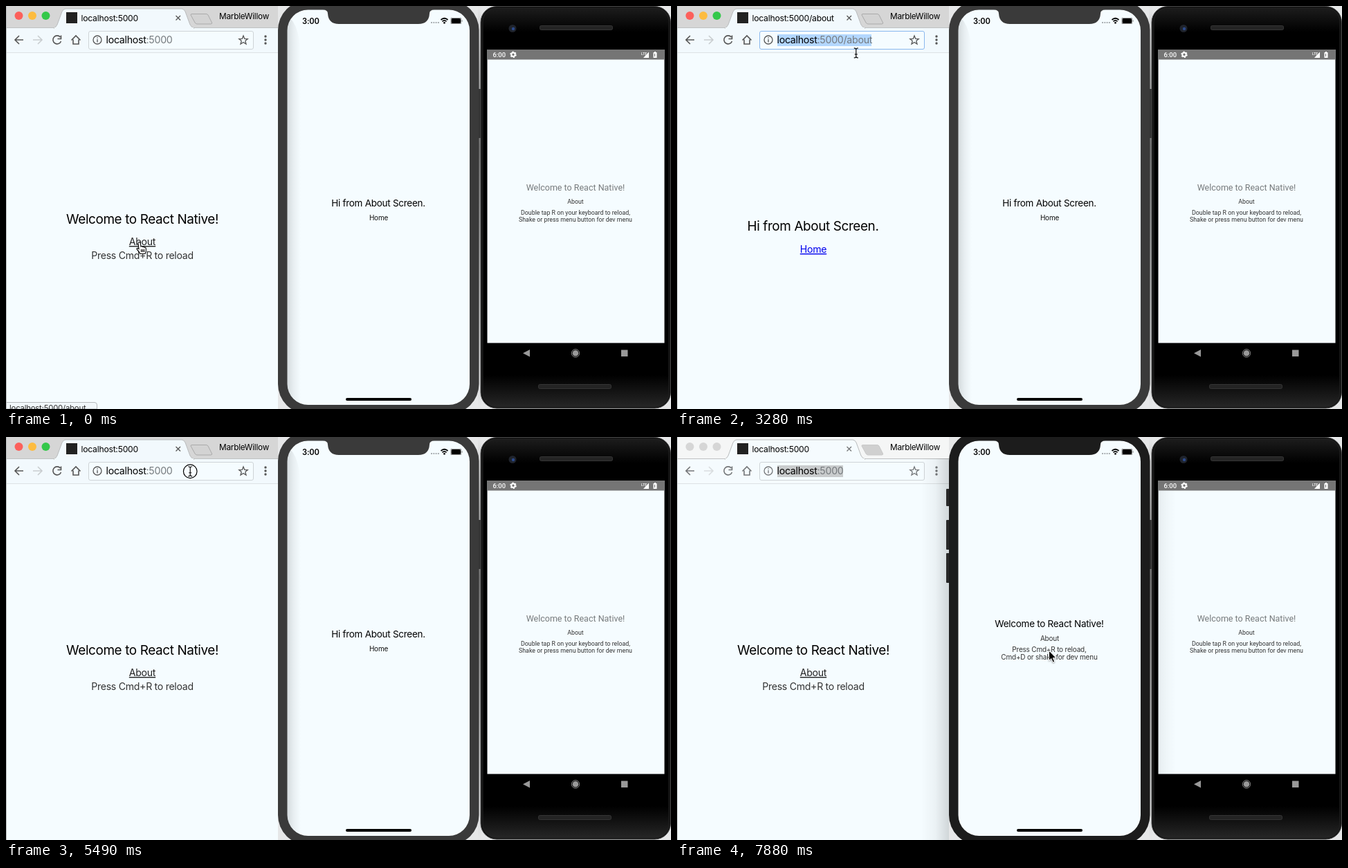
These frames come from a looping animation (961 px wide and 583 px high, 8000 ms). An HTML page:

```html
<!DOCTYPE html>
<html lang="en">
<head>
<meta charset="utf-8">
<title>One app on three screens</title>
<style>
  html, body { margin: 0; width: 100%; height: 100%; overflow: hidden; }
  svg { display: block; width: 961px; height: 583px; }
  text { font-family: Inter, "Open Sans", sans-serif; letter-spacing: -.02em; white-space: pre; }
  .mid { text-anchor: middle; }
  .droid text { font-family: Roboto, sans-serif; letter-spacing: 0; }
  .big { font-size: 18.9px; }
  .body { font-size: 14.1px; }
  .link { text-decoration: underline; }
  .small { font-size: 10px; }

  svg {
    --strip: #d6d6d6; --bar: #f2f9fd; --icon: #555; --faint: #c9cdd0;
    --red: #fc605b; --amber: #fdbc40; --green: #34c84a;
    --bezel: #3a3a3a; --plus: #d3d3d3; --plusEdge: #aaa; --mark: #b3d7ff;
  }
  svg.away {
    --strip: #f5f6f6; --bar: #f5fbfe; --icon: #747678; --faint: #d9dddf;
    --red: #d6d6d6; --amber: #d6d6d6; --green: #d6d6d6;
    --bezel: #1c1c1c; --plus: #d0d0d0; --plusEdge: #c8c8c8; --mark: #c9cccd;
  }
  .away .ifActive, svg:not(.away) .ifAway { display: none; }
  .icon { fill: none; stroke: var(--icon); stroke-width: 1.6; }
</style>
</head>
<body>
<svg id="stage" viewBox="0 0 961 583">
  <defs>
    <linearGradient id="fadeRight">
      <stop offset="0" stop-color="#000" stop-opacity=".13"/>
      <stop offset=".5" stop-color="#000" stop-opacity=".05"/>
      <stop offset="1" stop-color="#000" stop-opacity="0"/>
    </linearGradient>
    <linearGradient id="fadeLeft">
      <stop offset="0" stop-color="#000" stop-opacity="0"/>
      <stop offset=".5" stop-color="#000" stop-opacity=".04"/>
      <stop offset="1" stop-color="#000" stop-opacity=".15"/>
    </linearGradient>
    <linearGradient id="gap" x2="0" y2="1">
      <stop offset="0" stop-color="#e6e7e8"/>
      <stop offset=".35" stop-color="#777"/>
      <stop offset="1" stop-color="#e6e7e8"/>
    </linearGradient>
    <linearGradient id="shell" x2="0" y2="1">
      <stop offset="0" stop-color="#1c1c1c"/>
      <stop offset=".06" stop-color="#000"/>
      <stop offset=".92" stop-color="#000"/>
      <stop offset="1" stop-color="#262626"/>
    </linearGradient>
  </defs>
  <rect width="961" height="583" fill="#e6e7e8"/>

  <!-- browser -->
  <rect width="393" height="583" fill="#f5fcff"/>
  <rect width="393" height="31" fill="var(--strip)"/>
  <rect y="31" width="393" height="36" fill="var(--bar)"/>
  <path d="M0 31.5H69M271 31.5H393" stroke="#bfc1c2"/>
  <path d="M0 67.5H393" stroke="#dde2e4"/>
  <path d="M69 32Q72 31 74 27L81 8Q83 4 86 4H254Q257 4 259 8L266 27Q268 31 272 32Z" fill="var(--bar)" stroke="#b9bbbc"/>
  <path d="M70 32H271" stroke="var(--bar)" stroke-width="2"/>
  <path d="M269 11.500H289Q291 11.500 292 13L297.500 24Q298 26 296 26H276Q274 26 273 24L267 13Q266.500 11.500 269 11.500Z" fill="var(--plus)" stroke="var(--plusEdge)"/>
  <circle cx="18.500" cy="14" r="6" fill="var(--red)"/>
  <circle cx="38" cy="14" r="6" fill="var(--amber)"/>
  <circle cx="57.500" cy="14" r="6" fill="var(--green)"/>
  <rect x="87" y="9" width="16" height="16" fill="#222"/>
  <text id="title" x="108.500" y="21.500" font-size="12.2"></text>
  <path d="M245.500 14L252 20.500M252 14L245.500 20.500" class="icon" style="stroke-width:1.3"/>
  <text x="308" y="19" font-size="11.8">MarbleWillow</text>

  <g class="icon">
    <path d="M25 49H13M19 43L13 49L19 55"/>
    <path d="M39 49H51M46 43L52 49L46 55" stroke="var(--faint)"/>
    <path d="M78.500 45A6 6 0 1 0 79.500 51M79.500 42.500V47.500H74.500"/>
    <path d="M94.500 49.500L101 43L107.500 49.500M97 48.500V55H105V48.500"/>
  </g>
  <rect id="box" x="119.500" y="36.500" width="238" height="26" rx="2.500" fill="#f5fcff"/>
  <g class="icon" style="stroke-width:1.3">
    <circle cx="132" cy="49" r="6"/>
    <path d="M132 48V52.500M132 45.300V46.700"/>
    <path d="M343 43L344.700 47.300L349.300 47.600L345.800 50.600L347 55L343 52.500L339 55L340.200 50.600L336.700 47.600L341.300 47.300Z"/>
  </g>
  <g fill="var(--icon)">
    <circle cx="375" cy="44" r="1.700"/><circle cx="375" cy="49" r="1.700"/><circle cx="375" cy="54" r="1.700"/>
  </g>
  <rect id="mark" x="145" y="41" width="95" height="17" fill="var(--mark)"/>
  <text x="144.500" y="54" font-size="14.2">localhost<tspan id="path" fill="#757a7d"></tspan></text>

  <g id="webHome" class="mid">
    <text x="197" y="314.500" class="big">Welcome to React Native!</text>
    <text x="197" y="346" class="body link" fill="#222">About</text>
    <text x="197" y="365.500" class="body" fill="#333">Press Cmd+R to reload</text>
  </g>
  <g id="webAbout" class="mid">
    <text x="196.500" y="325" class="big">Hi from About Screen.</text>
    <text id="webLink" x="197" y="357" class="body link">Home</text>
  </g>
  <g id="status">
    <path d="M0 573.500H128Q131.500 573.500 131.500 577V583H0Z" fill="#f1f7fa" stroke="#b5b9bb"/>
    <text id="hint" x="5" y="586" font-size="11.4" fill="#333"></text>
  </g>
  <path d="M.5 0V583" stroke="#b8bcbe"/>
  <rect class="ifAway" x="353" y="31" width="40" height="552" fill="url(#fadeLeft)"/>

  <!-- left phone -->
  <g class="ifAway" fill="#292929">
    <rect x="389" y="75" width="6" height="25" rx="1"/>
    <rect x="389" y="120" width="6" height="43" rx="1"/>
    <rect x="389" y="168" width="6" height="43" rx="1"/>
  </g>
  <rect x="682" y="0" width="5" height="583" fill="url(#gap)"/>
  <rect x="682" y="120" width="5" height="71" fill="#333"/>
  <rect x="393" y="-8" width="290.500" height="598" rx="43" fill="var(--bezel)"/>
  <path d="M436 5.500H458Q465 5.500 465 11Q466 26 481 26H596Q611 26 612 11Q612 5.500 619 5.500H640A30 30 0 0 1 670 35.500V547A30 30 0 0 1 640 577H436.500A30 30 0 0 1 406.500 547V35.500A30 30 0 0 1 436.500 5.500Z" fill="#f5fcff"/>
  <path class="ifActive" d="M406.500 36Q407 26 412 19Q426 35 426 80V575Q406.500 568 406.500 547Z" fill="url(#fadeRight)"/>
  <text x="428" y="25.500" font-size="11.2" font-weight="600">3:00</text>
  <path d="M614 24H626" stroke="#aab0b3" stroke-width="2" stroke-dasharray="2 1.300"/>
  <path d="M628.500 20Q633.500 15.500 638.500 20M630.500 22.300Q633.500 19.500 636.500 22.300" fill="none" stroke="#000" stroke-width="1.700"/>
  <circle cx="633.500" cy="24.300" r="1.400"/>
  <rect x="643.500" y="18" width="13.500" height="7" rx="1.500"/>
  <path d="M643 17.500H657.500V25.500H643ZM659 20V23" fill="none" stroke="#777" stroke-width=".8"/>
  <g id="iosAbout" class="mid">
    <text x="538" y="290" font-size="13.5">Hi from About Screen.</text>
    <text id="iosLink" x="538.500" y="310" class="small" fill="#111">Home</text>
  </g>
  <g id="iosHome" class="mid">
    <text x="538" y="275" font-size="13.5">Welcome to React Native!</text>
    <g class="small" fill="#333">
      <text x="538.500" y="294.500">About</text>
      <text x="538" y="310.500">Press Cmd+R to reload,</text>
      <text x="538" y="322">Cmd+D or shake for dev menu</text>
    </g>
  </g>
  <rect x="491" y="567" width="95" height="4" rx="2"/>

  <!-- right phone -->
  <g class="droid">
    <rect x="686" y=".5" width="274.500" height="581.500" rx="23" fill="#111" stroke="#4a4a4a"/>
    <rect x="689" y="3" width="269" height="577" rx="20" fill="url(#shell)" stroke="#222"/>
    <g fill="#242424" stroke="#353535">
      <rect x="771.500" y="28.500" width="105" height="6" rx="2"/>
      <rect x="769.500" y="547.500" width="105" height="6" rx="2"/>
    </g>
    <circle cx="732" cy="32.500" r="5.500" fill="#20242c"/>
    <circle cx="733" cy="33" r="2.200" fill="#2c4a8c"/>
    <rect x="695.500" y="63" width="256" height="424.500" fill="#f5fcff"/>
    <rect x="695.500" y="63" width="256" height="14.500" fill="#757575"/>
    <g fill="#fff">
      <text x="703.500" y="73.800" font-size="9.4" font-weight="500">6:00</text>
      <circle cx="733" cy="70.300" r="2.700" fill="none" stroke="#fff" stroke-width="2"/>
      <circle cx="733" cy="70.300" r="4" fill="none" stroke="#fff" stroke-width="1.500" stroke-dasharray="2.100 2.090"/>
      <text x="918" y="70.500" font-size="5" font-weight="500">LTE</text>
      <path d="M921 75L929 66.500V75Z"/>
      <path d="M935.500 67H937V66H939V67H940.500V75H935.500Z"/>
    </g>
    <path d="M937.500 69V73" stroke="#757575"/>
    <g class="mid">
      <text x="823" y="267" font-size="12.5" fill="#777b7d">Welcome to React Native!</text>
      <g font-size="8.85" fill="#333">
        <text x="823" y="286.300">About</text>
        <text x="823" y="301.500">Double tap R on your keyboard to reload,</text>
        <text x="823" y="311.700">Shake or press menu button for dev menu</text>
      </g>
    </g>
    <rect class="ifAway" x="695.500" y="77.500" width="26" height="410" fill="url(#fadeRight)" opacity=".45"/>
    <g fill="#999">
      <path d="M747 502.300L757 497V507.600Z"/>
      <circle cx="823" cy="502.300" r="4.300"/>
      <circle cx="823" cy="502.300" r="5.700" fill="none" stroke="#888"/>
      <rect x="889" y="497.500" width="9.500" height="9.500"/>
    </g>
  </g>

  <!-- pointer shapes, each drawn around its hot spot -->
  <g id="pointer">
    <path id="arrow" d="M0 0V14.500L3.300 11.500L5.800 17L8.200 16L5.800 10.700H10.500Z" stroke="#fff" stroke-width="1" style="filter:drop-shadow(0 1px 1px #0006)"/>
    <path id="hand" d="M0 1.500Q0-.5 1.500-.5Q3 -.5 3.300 1.500L4 6Q5.500 4.800 6.500 6.500Q8 5.600 9 7.300Q11 6.500 11.300 9V12Q11 14 10 16.500H3Q1.500 13.500-1.800 10Q-2.500 8 -.5 8.300L1 9.500ZM4.500 10V14M6.500 10V14M8.500 10V14" fill="#fff" stroke="#000" stroke-width="1.100"/>
    <circle id="ring" r="9.800" fill="#fff" fill-opacity=".35" stroke="#000" stroke-width="1.200"/>
    <path id="beam" d="M-3-7Q0-7 0-5Q0-7 3-7M0-5V5M-3 7Q0 7 0 5Q0 7 3 7M-2 2H2" fill="none" stroke="#111" stroke-width="1.200"/>
  </g>
</svg>
<script>
const LOOP = 8000;
const $ = id => document.getElementById(id);
const show = (id, on) => $(id).style.display = on ? '' : 'none';

// time, x, y, pointer shape until the next entry
const route = [
  [0, 191, 342, 'hand'], [1079, 191, 342, 'hand'],
  [1080, 151, 405, 'arrow'], [1520, 167, 398, 'arrow'], [1900, 167, 398, 'arrow'],
  [2400, 243.5, 77, 'arrow'], [2570, 265, 52, 'beam'], [2750, 270, 38, 'beam'],
  [2930, 270, 38, 'press'], [3020, 270, 38, 'beam'], [3150, 270, 38, 'beam'],
  [3290, 258, 70, 'arrow'], [3810, 196, 350, 'hand'], [3990, 193, 357, 'hand'],
  [4080, 193, 357, 'press'], [4170, 193, 357, 'arrow'], [4300, 193, 357, 'arrow'],
  [5140, 254, 62, 'arrow'], [5230, 262, 54, 'beam'], [5400, 266, 49, 'beam'],
  [5480, 266, 49, 'press'], [5580, 268, 56, 'beam'], [5980, 268, 56, 'beam'],
  [6050, 290, 85, 'arrow'], [6390, 470, 303, 'arrow'], [6599, 470, 303, 'arrow'],
  [6600, 485.5, 311, 'arrow'], [6690, 485.5, 311, 'arrow'],
  [7260, 537.5, 309, 'arrow'], [LOOP, 537.5, 309, 'arrow']
];

function movePointer(t) {
  const i = route.findIndex((_, n) => t < route[n + 1][0]);
  const [t0, x0, y0, shape] = route[i], [t1, x1, y1] = route[i + 1];
  const k = (t - t0) / (t1 - t0);
  $('pointer').setAttribute('transform', `translate(${x0 + (x1 - x0) * k} ${y0 + (y1 - y0) * k})`);
  show('arrow', shape === 'arrow');
  show('hand', shape === 'hand');
  show('ring', shape === 'press');
  show('beam', shape === 'beam' || shape === 'press');
}

function draw(t) {
  const within = (a, b) => t >= a && t < b;
  const onAbout = within(120, 4170);
  const away = t >= 6600;
  const focus = within(2930, 4080) || t >= 5580;

  $('stage').classList.toggle('away', away);
  show('webAbout', onAbout);
  show('webHome', !onAbout);
  $('webLink').setAttribute('fill', within(4080, 4170) ? '#f00' : '#00e');
  $('title').textContent = 'localhost:5000' + (within(270, 4350) ? '/about' : '');
  $('path').textContent = ':5000' + (onAbout ? '/about' : '');

  show('mark', focus);
  $('mark').setAttribute('width', onAbout ? 136 : 95);
  $('box').setAttribute('stroke', focus && !away ? '#8ab8ee' : '#cfd4d7');

  show('status', t < 1520 || within(3810, 4900));
  $('hint').textContent = 'localhost:5000' + (t < 120 || t >= 4400 ? '/about' : '');

  show('iosAbout', t < 7710);
  show('iosHome', t >= 7710);
  $('iosLink').setAttribute('opacity', t >= 7620 ? .3 : 1);
  movePointer(t);
}

function tick() {
  draw(performance.now() % LOOP);
  requestAnimationFrame(tick);
}
tick();
</script>
</body>
</html>
```
